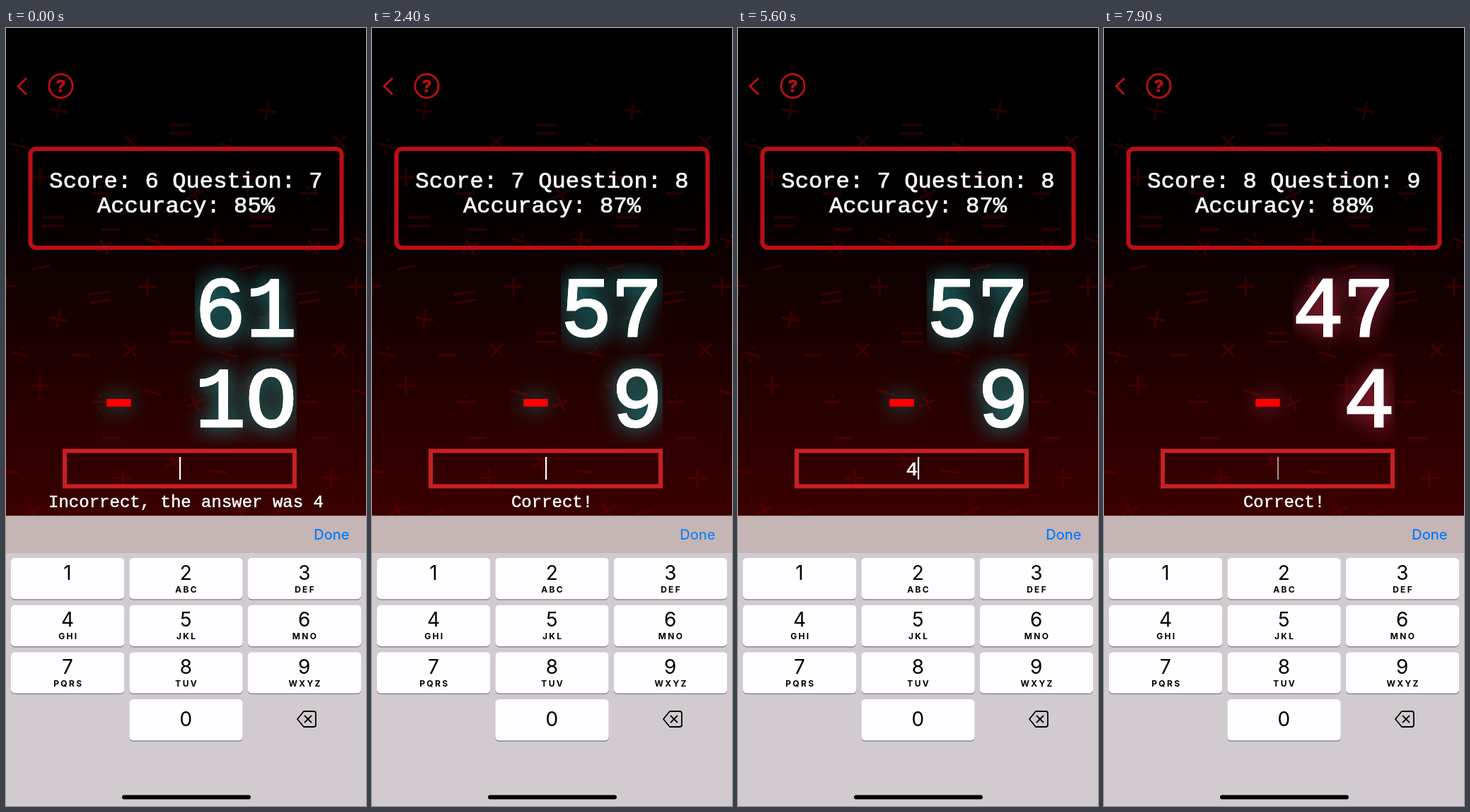
Write an HTML page with a canvas that moves like this. It is 509 px wide and 1101 px high and loops after 8000 ms.

```html
<!DOCTYPE html>
<html lang="en">
<head>
<meta charset="utf-8">
<title>Subtraction practice</title>
<style>
html, body { margin: 0; width: 100%; height: 100%; overflow: hidden; background: #000; }
canvas { display: block; width: 509px; height: 1101px; }
</style>
</head>
<body>
<canvas id="stage" width="509" height="1101"></canvas>
<script>
const ctx = document.getElementById('stage').getContext('2d');
const LOOP = 8000;
const RED = '#bb0e14';
const MONO = '"Liberation Mono", monospace';
const SANS = 'Inter, sans-serif';
const TEAL = 'rgb(24,148,148)';
const ROSE = 'rgb(165,38,66)';

const rounds = [
  { from: 0, top: '61', bottom: '10', score: 6, accuracy: 85, glow: TEAL, message: 'Incorrect, the answer was 4' },
  { from: 2100, top: '57', bottom: '9', score: 7, accuracy: 87, glow: TEAL, message: 'Correct!' },
  { from: 7000, top: '47', bottom: '4', score: 8, accuracy: 88, glow: ROSE, message: 'Correct!' }
];
const presses = [
  { key: '5', down: 700, up: 900 },
  { key: '1', down: 1400, up: 1500 },
  { key: '4', down: 5200, up: 5400 },
  { key: '8', down: 5900, up: 6100 }
];
const submits = [2000, 6900];
const letters = ['', 'ABC', 'DEF', 'GHI', 'JKL', 'MNO', 'PQRS', 'TUV', 'WXYZ'];

// Background marks: kind, x, y, degrees. The first group also repeats further down.
const repeated = [
  ['+', 74, 117, 10], ['=', 246, 143, 0], ['x', 176, 161, 0], ['/', 20, 167, 15],
  ['+', 48, 211, 0], ['/', 133, 234, 0], ['x', 267, 236, 20], ['-', 149, 285, 0]
];
const single = [
  ['=', 66, 274, 0], ['+', 295, 300, 5], ['/', 210, 302, 20], ['x', 139, 310, 15],
  ['-', 49, 339, -12], ['+', 200, 366, 0], ['+', 0, 365, 0], ['=', 132, 381, -8],
  ['-', 106, 463, 0], ['-', 208, 516, 16], ['x', 238, 615, 20], ['-', 5, 628, 8],
  ['+', 165, 637, 0], ['x', 37, 683, 20], ['-', 91, 685, -15]
];

function line(...points) {
  ctx.beginPath();
  for (let i = 0; i < points.length; i += 2) ctx.lineTo(points[i], points[i + 1]);
  ctx.stroke();
}

function rounded(x, y, w, h, r, color) {
  ctx.fillStyle = color;
  ctx.beginPath();
  ctx.roundRect(x, y, w, h, r);
  ctx.fill();
}

function text(value, x, y, font, color, align = 'center', weight = 0) {
  ctx.font = font;
  ctx.textAlign = align;
  ctx.fillStyle = ctx.strokeStyle = color;
  ctx.fillText(value, x, y);
  if (weight) {
    ctx.lineWidth = weight;
    ctx.strokeText(value, x, y);
  }
}

function mark(kind, x, y, degrees) {
  ctx.save();
  ctx.translate(x, y);
  ctx.rotate(degrees * Math.PI / 180);
  const alpha = 0.3 + 0.1 * Math.min(1, y / 400);
  ctx.strokeStyle = ctx.fillStyle = `rgba(108,0,0,${alpha})`;
  ctx.lineWidth = 3.5;
  ctx.beginPath();
  const stroke = (x1, y1, x2, y2) => { ctx.moveTo(x1, y1); ctx.lineTo(x2, y2); };
  if (kind === '+') { stroke(-13, 0, 13, 0); stroke(0, -13, 0, 13); }
  if (kind === 'x') { stroke(-9, -9, 9, 9); stroke(9, -9, -9, 9); }
  if (kind === '=') { stroke(-15, -6, 15, -6); stroke(-15, 6, 15, 6); }
  if (kind === '-' || kind === '/') stroke(-13, 0, 13, 0);
  if (kind === '/') { stroke(0, -11, 0, -7); stroke(0, 7, 0, 11); }
  ctx.stroke();
  ctx.restore();
}

function background() {
  const shade = ctx.createLinearGradient(0, 0, 0, 690);
  shade.addColorStop(0, '#000');
  shade.addColorStop(0.34, '#020000');
  shade.addColorStop(1, '#3b0000');
  ctx.fillStyle = shade;
  ctx.fillRect(0, 0, 509, 1101);
  for (const dx of [0, 295]) {
    for (const [kind, x, y, a] of repeated) {
      mark(kind, x + dx, y, a);
      mark(kind, x + dx, y + 295, a);
    }
    for (const [kind, x, y, a] of single) mark(kind, x + dx, y, a);
  }
}

function header(round) {
  ctx.strokeStyle = RED;
  ctx.lineWidth = 2.8;
  line(29, 71, 17, 82.5, 29, 94);
  ctx.beginPath();
  ctx.arc(77.5, 82, 16.6, 0, Math.PI * 2);
  ctx.stroke();
  text('?', 77.5, 91, '800 25px ' + SANS, RED);
  ctx.lineWidth = 6;
  ctx.beginPath();
  ctx.roundRect(34.5, 171, 440, 140, 8);
  ctx.stroke();
  const font = '32.2px ' + MONO;
  text(`Score: ${round.score} Question: ${round.score + 1}`, 254.5, 226, font, '#fff', 'center', 0.7);
  text(`Accuracy: ${round.accuracy}%`, 254.5, 261, font, '#fff', 'center', 0.7);
}

function digits(value, baseline) {
  // The letter O stands for an open zero.
  text(value.replace('0', 'O'), 411, baseline, '120px ' + MONO, '#fff', 'right', 2.6);
  if (value.endsWith('7')) ctx.fillRect(346, baseline - 78, 10, 22);
}

function minus(x) {
  ctx.fillStyle = '#f00';
  ctx.fillRect(x - 17, 525, 34, 10.5);
}

function glowing(left, top, color, draw) {
  ctx.save();
  ctx.beginPath();
  ctx.rect(left, top, 411 - left, 128);
  ctx.clip();
  ctx.shadowColor = color;
  ctx.shadowBlur = 30;
  draw();
  ctx.restore();
  draw();
}

function sum({ top, bottom, glow }) {
  const left = 411 - 72 * (bottom.length + 2);
  glowing(267, 333, glow, () => digits(top, 436));
  glowing(left, 461, glow, () => {
    minus(left + 36.5);
    digits(bottom, 564);
  });
}

function caretAlpha(t) {
  const start = t < 900 ? 250 : t < 5400 ? 3100 : 7900;
  if (t < start) return 1;
  const phase = (t - start) % 1000;
  return phase < 100 ? 0.55 : phase < 550 ? 0 : 1;
}

function answer(t, round) {
  const typed = presses.filter(p => p.up > round.from && p.up <= t).map(p => p.key).join('');
  ctx.strokeStyle = '#c82023';
  ctx.lineWidth = 6;
  ctx.strokeRect(83, 598.5, 325, 50);
  text(typed, 246, 633, '28px ' + MONO, '#fff', 'center', 0.6);
  ctx.fillStyle = `rgba(255,255,255,${caretAlpha(t)})`;
  ctx.fillRect(245 + typed.length * 9, 607, 2.2, 32);
  if (!typed) text(round.message, 254.5, 678, '24px ' + MONO, '#fff', 'center', 0.5);
}

function doneAlpha(t) {
  const age = Math.min(...submits.filter(s => s <= t).map(s => t - s));
  if (age < 100) return 0.35;
  return Math.min(1, 0.5 + (age - 100) / 800);
}

function key(label, column, row, pressed) {
  const x = 7 + column * 167.4;
  const y = 750 + row * 66.7;
  rounded(x, y + 1.3, 160.3, 58.4, 5.5, '#8b888d');
  rounded(x, y, 160.3, 58.2, 5.5, pressed ? '#b7b5c3' : '#fefdff');
  text(label, x + 80, y + (label === '0' ? 37.5 : 30.5), '28px ' + SANS, '#000');
  const caption = letters[label - 1];
  if (caption) {
    ctx.letterSpacing = '2.3px';
    text(caption, x + 81.3, y + 48.7, '700 12px ' + SANS, '#000');
    ctx.letterSpacing = '0px';
  }
}

function keyboard(t) {
  ctx.fillStyle = '#d1cbd0';
  ctx.fillRect(0, 690.5, 509, 411);
  ctx.fillStyle = '#c6b5b5';
  ctx.fillRect(0, 690.5, 509, 52.5);
  ctx.globalAlpha = doneAlpha(t);
  text('Done', 485.5, 724, '500 20px ' + SANS, '#007aff', 'right');
  ctx.globalAlpha = 1;

  const held = presses.find(p => t >= p.down && t < p.up)?.key;
  for (let n = 1; n <= 9; n++) {
    key(String(n), (n - 1) % 3, Math.floor((n - 1) / 3), held === String(n));
  }
  key('0', 1, 3, false);

  ctx.strokeStyle = '#000';
  ctx.lineWidth = 1.8;
  ctx.lineJoin = 'round';
  ctx.beginPath();
  ctx.moveTo(412, 978);
  ctx.lineTo(421, 967);
  ctx.arcTo(438, 967, 438, 978, 3);
  ctx.arcTo(438, 989, 421, 989, 3);
  ctx.lineTo(421, 989);
  ctx.closePath();
  ctx.stroke();
  line(422, 973, 432, 983);
  line(432, 973, 422, 983);
  ctx.lineJoin = 'miter';
  rounded(164, 1085.5, 182, 6, 3, '#000');
}

function render(t) {
  const round = rounds.findLast(r => r.from <= t);
  background();
  header(round);
  sum(round);
  answer(t, round);
  keyboard(t);
}

const began = performance.now();
function tick() {
  render((performance.now() - began) % LOOP);
  requestAnimationFrame(tick);
}
tick();
</script>
</body>
</html>
```
